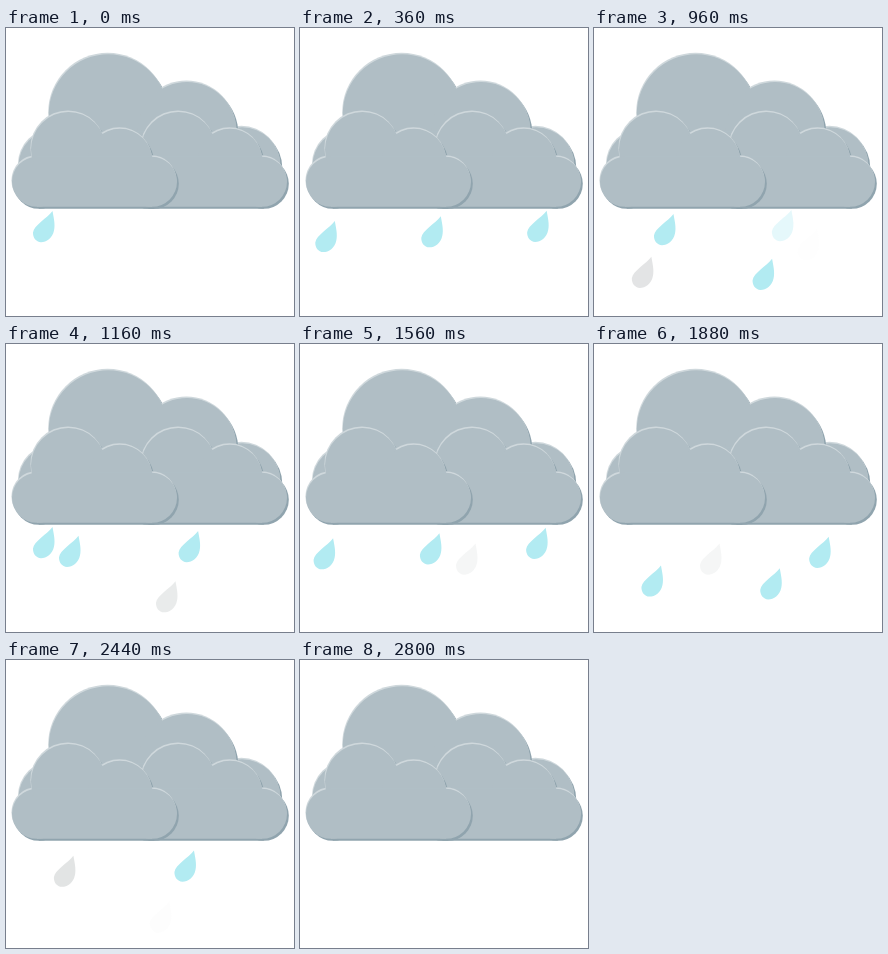
These frames come from a looping animation (288 px wide and 288 px high, 2.88 s). An HTML page:

```html
<!DOCTYPE html>
<html lang="en">
<head>
<meta charset="utf-8">
<title>Rain cloud</title>
<style>
  html, body { margin: 0; width: 100%; height: 100%; overflow: hidden; background: #fff; }
  svg { display: block; width: 100vw; height: 100vh; }
  .dark { fill: #90a4ae; }
  .light { fill: #cfd8dc; }
  .body { fill: #b0bec5; }
</style>
</head>
<body>
<svg id="stage" viewBox="0 0 288 288">
  <defs>
    <g id="puff">
      <circle cx="32" cy="155" r="25"/>
      <circle cx="63.5" cy="122.7" r="37.5"/>
      <circle cx="115" cy="134.5" r="32.5"/>
      <circle cx="147" cy="155" r="25"/>
      <path d="M32 130H147V180H32Z"/>
    </g>
    <g id="big">
      <circle cx="103.3" cy="87" r="59.5"/>
      <circle cx="182" cy="104.7" r="49.5"/>
      <path d="M70 105H215V150H70Z"/>
    </g>
    <circle id="left" cx="49.5" cy="139" r="36"/>
    <circle id="right" cx="237" cy="139" r="38.5"/>
    <path id="drop" d="M8.5-16C9.5-10 11.5-2.5 10 3.5C8.5 11 2.5 15.2-3 15.2C-8 15-11.3 10.5-11 5.5C-10-2 3-8.5 8.5-16Z"/>
  </defs>
  <g id="rain"></g>
  <g id="cloud"></g>
</svg>
<script>
const LOOP = 2880, STEP = 40, CYCLE = 1160;
const FADE_IN = 60, FADE_OUT = 440, LIFE = 620;

// start time, x, y
const DROPS = [
  [0, 38, 199],
  [160, 138, 199],
  [345, 238.5, 198.5],
  [510, 64.5, 232],
  [670, 178.5, 239],
  [835, 74.3, 199],
  [1000, 188, 199]
];

function use(parent, id, attrs) {
  const el = document.createElementNS('http://www.w3.org/2000/svg', 'use');
  el.setAttribute('href', '#' + id);
  for (const key in attrs) el.setAttribute(key, attrs[key]);
  return parent.appendChild(el);
}

// Bevelled shape: shaded below, lit from the top left.
function bevel(id, x = 0) {
  const cloud = document.getElementById('cloud');
  use(cloud, id, { class: 'dark', x: x + 0.8, y: 0.8 });
  use(cloud, id, { class: 'light', x: x - 1.6, y: -2.8 });
  use(cloud, id, { class: 'body', x: x - 1, y: -1.2 });
}

bevel('left');
bevel('right');
bevel('big');
bevel('puff', 110);
bevel('puff');

const rain = document.getElementById('rain');
const drops = [0, CYCLE].flatMap(shift => DROPS.map(([start, x, y]) =>
  ({ start: start + shift, x, y, el: use(rain, 'drop', {}) })));

function place({ start, x, y, el }, time) {
  const t = time - start;
  const shown = t > -FADE_IN && t < LIFE;
  el.setAttribute('visibility', shown ? 'visible' : 'hidden');
  if (!shown) return;
  const dx = -t * (0.0235 + 2.5e-5 * t);
  const dy = t * (0.0235 + 1.1e-5 * t);
  const fading = t > FADE_OUT;
  const alpha = fading ? 0.6 * (LIFE - t) / (LIFE - FADE_OUT) : Math.min(1, 1 + t / FADE_IN);
  el.setAttribute('transform', `translate(${x + dx} ${y + dy})`);
  el.setAttribute('fill', fading ? '#cdd0d1' : '#b2ebf2');
  el.setAttribute('opacity', alpha);
}

const begin = performance.now();
function draw() {
  const elapsed = (performance.now() - begin) % LOOP;
  const time = Math.min(Math.floor(elapsed / STEP) * STEP, LOOP - 2 * STEP);
  drops.forEach(drop => place(drop, time));
  requestAnimationFrame(draw);
}
draw();
</script>
</body>
</html>
```
